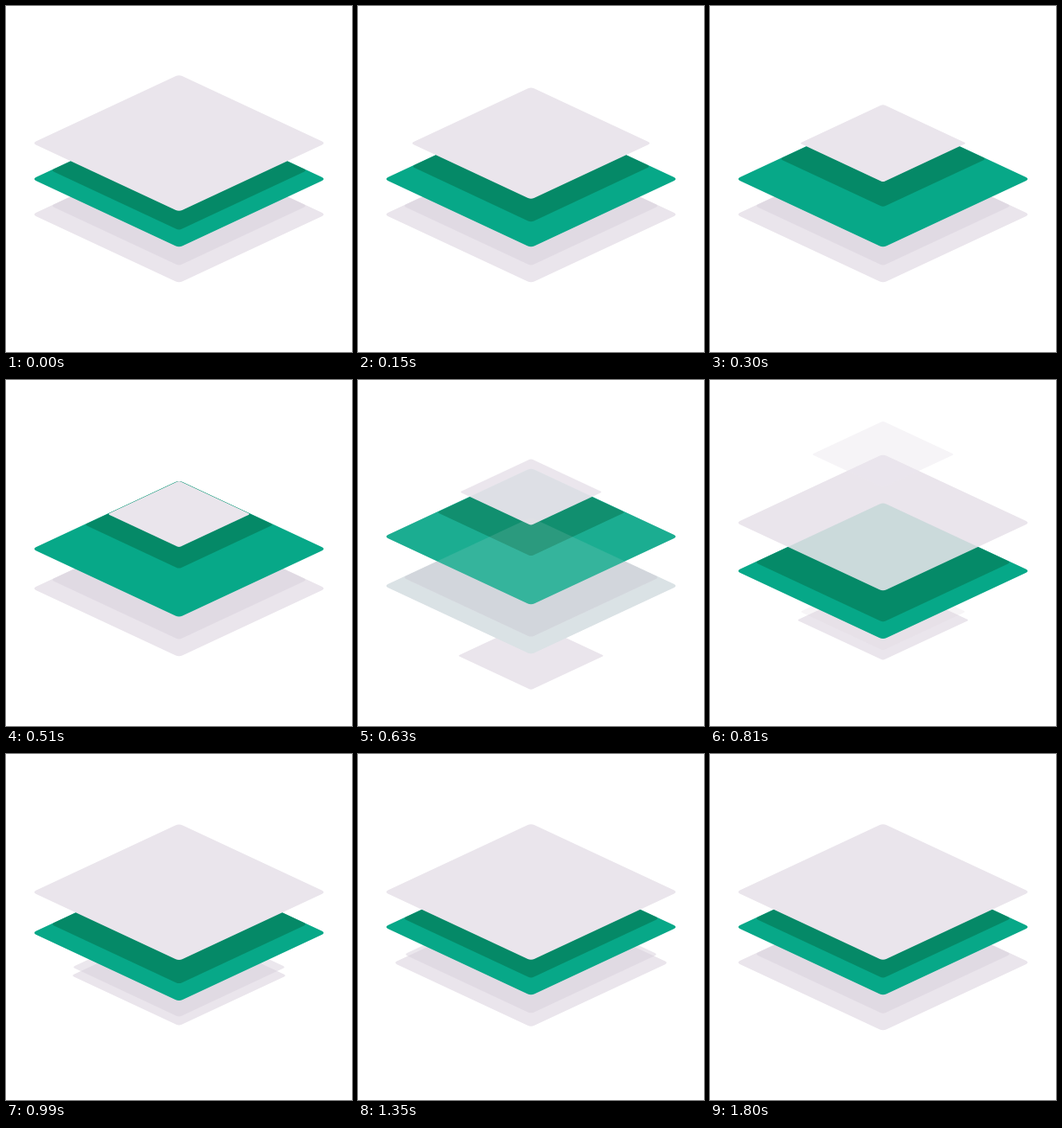
Recreate the animation shown at these times as an HTML page with a canvas. Size 400 by 400 pixels, loop 1830 ms.

```html
<!DOCTYPE html>
<html>
<head>
<meta charset="utf-8">
<style>
  html, body { margin: 0; width: 100%; height: 100%; overflow: hidden; background: #fff; }
  canvas { display: block; }
</style>
</head>
<body>
<canvas id="stage" width="400" height="400"></canvas>
<script>
const ctx = document.getElementById('stage').getContext('2d');
const LOOP = 1830, STEP = 30;
const RX = 167.2, RATIO = 0.467;   // half width of a full tile, height to width
const SHADE = 146 / RX;            // full size of a shadow
const LIGHT = [234, 229, 236], LIGHT_DARK = [216, 207, 220];
const GREEN = [7, 168, 136], GREEN_DARK = [5, 108, 72];

const clamp = x => Math.max(0, Math.min(1, x));
const lerp = (a, b, k) => a + (b - a) * k;
const mix = (a, b, k) => a.map((v, i) => lerp(v, b[i], k));
const ramp = (t, from, to) => clamp((t - from) / (to - from));

// cubic-bezier(a, 0, b, 1) solved by bisection
function ease(x, a = 1 / 3, b = 1 / 3) {
  if (x <= 0 || x >= 1) return clamp(x);
  let lo = 0, hi = 1, u;
  for (let i = 0; i < 24; i++) {
    u = (lo + hi) / 2;
    const v = 1 - u;
    if (3 * v * v * u * a + 3 * v * u * u * b + u ** 3 < x) lo = u; else hi = u;
  }
  return u * u * (3 - 2 * u);
}
const move = (t, from, to, start, end, a, b) => lerp(start, end, ease(ramp(t, from, to), a, b));

function tile(y, size, color, alpha) {
  if (alpha <= 0) return;
  ctx.save();
  ctx.translate(200, y);
  ctx.scale(size, size * RATIO);
  ctx.rotate(Math.PI / 4);
  ctx.beginPath();
  ctx.roundRect(-120, -120, 240, 240, 6);
  ctx.globalAlpha = alpha;
  ctx.fillStyle = `rgb(${color.map(Math.round)})`;
  ctx.fill();
  ctx.restore();
}

// The shadow on a full tile shares the tile's top corner.
const shadeY = (y, size) => y - (1 - size) * RX * RATIO;

function draw(t) {
  ctx.clearRect(0, 0, 400, 400);

  // new tile rising from below
  const newY = move(t, 520, 1420, 340, 241, 0.14, 0.18);
  tile(newY, move(t, 520, 1800, 0.485, 1), LIGHT, ramp(t, 540, 620));
  tile(newY - 9.7, move(t, 540, 1490, 0.425, SHADE), LIGHT_DARK, 0.5 * ramp(t, 700, 950));

  // bottom tile becoming the green one
  const lowY = move(t, 520, 1300, 241, 200);
  const toGreen = ramp(t, 620, 760);
  const low = alpha => {
    tile(lowY, 1, mix(LIGHT, GREEN, toGreen), alpha);
    tile(shadeY(lowY, SHADE), SHADE, mix(LIGHT_DARK, GREEN_DARK, toGreen), alpha / 2);
  };
  low(1);

  // green tile becoming the top one
  const midY = move(t, 390, 1060, 200, 159.4);
  const midShade = move(t, 0, 585, SHADE, 107 / RX);
  tile(midY, 1, mix(GREEN, LIGHT, ramp(t, 620, 732)), 1);
  tile(shadeY(midY, midShade), midShade, GREEN_DARK, 0.5 * (1 - toGreen));

  // bottom tile showing through while the colours change
  low(0.24 * Math.sin(Math.PI * ramp(t, 600, 840)));

  // old top tile shrinking and leaving
  tile(move(t, 440, 1100, 158.6, 67), move(t, 0, 495, 1, 0.485), LIGHT, 1 - ramp(t, 610, 960));
}

const start = performance.now();
function frame() {
  const t = (performance.now() - start) % LOOP;
  draw(Math.floor(t / STEP) * STEP);
  requestAnimationFrame(frame);
}
frame();
</script>
</body>
</html>
```
